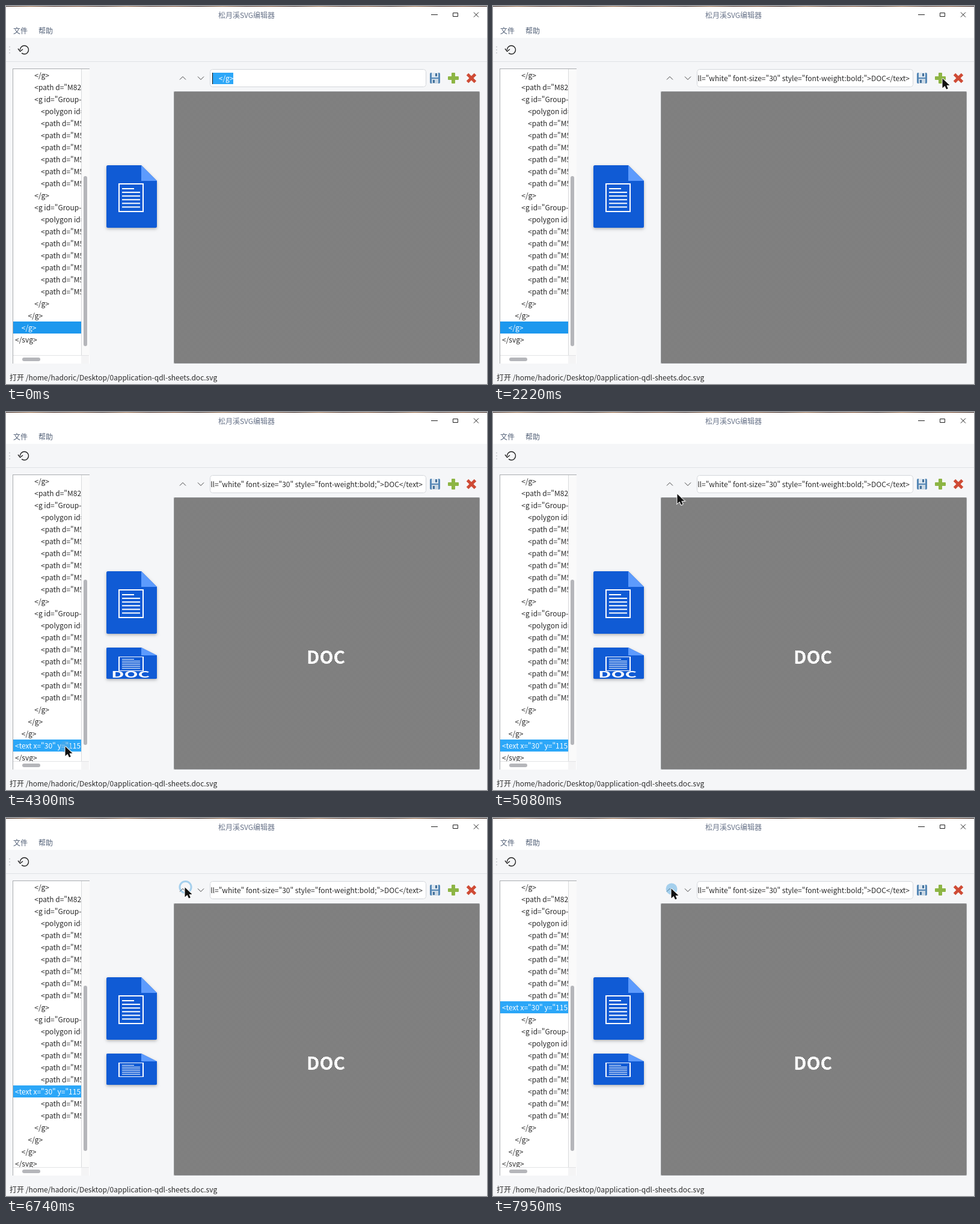
An HTML page with a canvas that plays this animation: 800x629 px, repeating every 8000 ms.

```html
<!DOCTYPE html>
<html lang="zh">
<head>
<meta charset="utf-8">
<style>
html, body { margin: 0; width: 100%; height: 100%; overflow: hidden; background: #f5f6f8; }
canvas { display: block; }
</style>
</head>
<body>
<canvas id="stage" width="800" height="629"></canvas>
<script>
const ctx = document.getElementById('stage').getContext('2d', { alpha: false });
const FONT = '"Noto Sans CJK SC", "Noto Sans CJK", "Noto Sans", sans-serif';
const LOOP = 8000;
const INK = '#2b2b2b', BACK = '#f5f6f8', HIGHLIGHT = '#2ca7f8';
const TEXT_TAG = '<text x="30" y="115" fill="white" font-size="30" style="font-weight:bold;">DOC</text>';
const PASTE = 710, INSERT = 2620, SELECT = 4300;

// Release times of the "move up" button; each one lifts the text row by one.
const lifts = [5850, ...Array.from({ length: 11 }, (_, i) => 6160 + i * 174)];
const presses = [2470, ...lifts.map(t => t - 112)];
const releases = [INSERT, SELECT, ...lifts];

// Pointer keys: time, x, y
const path = [
  [0, 343, 120], [110, 343, 120], [370, 467, 122], [1070, 467, 122], [1490, 747, 120],
  [3190, 747, 120], [3570, 238, 524], [3980, 102, 579], [4020, 102, 579], [4180, 98, 556],
  [4450, 98, 556], [4800, 314, 180], [4880, 314, 180], [5080, 306, 136], [5210, 298, 120],
  [5430, 298, 120], [5510, 297, 115], [7340, 297, 115], [7900, 296, 117], [8000, 296, 117]
];

const paths = n => Array(n).fill([4, '<path d="M53.7,82']);
const group = [[3, '<g id="Group-2"'], [4, '<polygon id="path"'], ...paths(6), [3, '</g>']];
const source = [[3, '</g>'], [3, '<path d="M82.5,31'], ...group, ...group,
  [2, '</g>'], [1, '</g>'], [0, '</svg>']];

const checker = (() => {
  const tile = document.createElement('canvas');
  tile.width = tile.height = 2;
  const c = tile.getContext('2d');
  c.fillStyle = '#fff';
  c.fillRect(0, 0, 2, 2);
  c.fillStyle = '#000';
  c.fillRect(0, 0, 1, 1);
  c.fillRect(1, 1, 1, 1);
  return ctx.createPattern(tile, 'repeat');
})();

function rect(x, y, w, h, color, radius = 0) {
  ctx.fillStyle = color;
  ctx.beginPath();
  ctx.roundRect(x, y, w, h, radius);
  ctx.fill();
}

function frame(x, y, w, h, color, width = 1, radius = 0) {
  ctx.strokeStyle = color;
  ctx.lineWidth = width;
  ctx.beginPath();
  ctx.roundRect(x, y, w, h, radius);
  ctx.stroke();
}

function line(points, color = INK, width = 1) {
  ctx.strokeStyle = color;
  ctx.lineWidth = width;
  ctx.beginPath();
  points.forEach(([x, y]) => ctx.lineTo(x, y));
  ctx.stroke();
}

function poly(points, color) {
  ctx.fillStyle = color;
  ctx.beginPath();
  points.forEach(([x, y]) => ctx.lineTo(x, y));
  ctx.closePath();
  ctx.fill();
}

function text(str, x, y, color = INK, font = '12px', align = 'left') {
  ctx.font = `${font} ${FONT}`;
  ctx.textAlign = align;
  ctx.fillStyle = color;
  ctx.fillText(str, x, y);
}

function clipped(x, y, w, h, paint) {
  ctx.save();
  ctx.beginPath();
  ctx.rect(x, y, w, h);
  ctx.clip();
  paint();
  ctx.restore();
}

function drawWindow() {
  rect(0, 0, 800, 629, BACK);
  rect(0, 0, 800, 53, '#fff');
  const strip = ctx.createLinearGradient(0, 0, 800, 0);
  for (let i = 0; i <= 20; i++) strip.addColorStop(i / 20, ['#2a1712', '#6b3a1d', '#3b2018', '#8a5a34'][i * 7 % 4]);
  rect(0, 0, 800, 1, strip);
  text('松月溪SVG编辑器', 400, 20, '#69748a', '12px', 'center');
  line([[707, 14.5], [718, 14.5]], '#222');
  frame(743.5, 11.5, 8, 6, '#222');
  line([[778, 10.5], [786, 18.5]], '#222');
  line([[786, 10.5], [778, 18.5]], '#222');
  text('文件', 12, 46, '#526077');
  text('帮助', 54, 46, '#526077');

  for (const y of [67, 72, 77]) rect(5, y, 2, 2, '#d3d5d9');
  ctx.strokeStyle = '#222';
  ctx.lineWidth = 1.4;
  ctx.beginPath();
  ctx.arc(30.5, 73, 7, Math.PI, Math.PI * 2.72);
  ctx.stroke();
  line([[20, 71], [23.5, 75.5], [28, 72]], '#222', 1.4);
  rect(0, 92, 800, 1, '#dfe1e5');
  text('打开 /home/hadoric/Desktop/0application-qdl-sheets.doc.svg', 6, 623);
}

function drawList(rows, selected, focused, inserted) {
  rect(11, 104, 128, 491, '#fff');
  rect(126, 105, 13, 476, '#fafafa');
  clipped(12, 105, 113, 476, () => rows.forEach(([indent, str], i) => {
    const y = 105 + i * 20;
    if (i === selected) rect(12, y, 113, 20, focused ? HIGHLIGHT : '#1d98ee');
    text(' '.repeat(indent * 4) + str, 15, y + 15, i === selected ? '#fff' : INK);
  }));
  rect(11, 104, 1, 491, '#a9acb0');
  rect(11, 104, 128, 1, '#a9acb0');
  rect(125, 105, 1, 476, '#d9dadc');
  rect(12, 581, 126, 1, '#e3e4e6');
  rect(125, 582, 13, 13, '#f4f4f5');
  if (inserted) rect(129, 279, 6, 275, '#b5b6ba', 3);
  else rect(129, 283, 6, 283, '#b5b6ba', 3);
  rect(27, 585, 30, 6, '#b5b6ba', 3);
}

function drawDocument(y, scaleY, label) {
  ctx.save();
  ctx.translate(145, y);
  ctx.scale(1, scaleY);
  ctx.save();
  ctx.shadowColor = 'rgba(0,0,0,.28)';
  ctx.shadowBlur = 5;
  ctx.shadowOffsetY = 2;
  ctx.fillStyle = '#105bd5';
  ctx.beginPath();
  ctx.moveTo(24, 15);
  ctx.lineTo(80, 15);
  ctx.lineTo(106, 41);
  ctx.arcTo(106, 119, 22, 119, 2.5);
  ctx.arcTo(22, 119, 22, 15, 2.5);
  ctx.arcTo(22, 15, 80, 15, 2.5);
  ctx.fill();
  ctx.restore();
  poly([[80, 15], [106, 41], [80, 41]], '#5d9bfd');
  frame(43, 46, 40, 46, '#fff', 2);
  for (let i = 0; i < 6; i++) rect(48, 53 + i * 6.1, i ? 30 : 20, 2, '#fff');
  if (label) text('DOC', 30, 115, '#fff', 'bold 30px');
  ctx.restore();
}

function drawToolbar(t, pressed) {
  if (pressed) {
    const x = t < SELECT ? 730.5 : 280.5;
    rect(x, 106.5, 27, 27, '#cbd8ea', 2);
    frame(x, 106.5, 27, 27, '#a6c8e8', 1, 2);
  }
  line([[289, 122.5], [294, 117.5], [299, 122.5]], '#444');
  line([[319, 117.5], [324, 122.5], [329, 117.5]], '#444');

  rect(339, 105, 360, 30, '#fff', 4);
  frame(339.5, 105.5, 359, 29, '#d3d6db', 1, 4);
  if (t < PASTE) {
    rect(343, 111, 35, 19, HIGHLIGHT);
    text('    </g>', 343, 125, '#fff');
    if (t < 110) rect(343, 111, 1, 19, '#111');
  } else {
    clipped(341, 106, 356, 28, () => text(TEXT_TAG, 693, 125, INK, '12px', 'right'));
    if (t < SELECT && (t - PASTE) % 1000 < 500) rect(694, 111, 1, 18, '#111');
  }

  rect(705, 111, 17, 18, '#5688b6', 2);
  rect(708, 111, 11, 8, '#dce6ef');
  rect(714, 112, 3, 5, '#44719b');
  rect(708, 121, 11, 8, '#c9d7e4');
  rect(710, 123, 3, 5, '#44719b');
  rect(741, 111, 6, 18, '#8db544', 1);
  rect(735, 117, 18, 6, '#8db544', 1);
  line([[767.5, 113.5], [780.5, 126.5]], '#cf4b35', 5);
  line([[780.5, 113.5], [767.5, 126.5]], '#cf4b35', 5);
}

function drawScene(labelled) {
  rect(279, 142, 509, 453, checker);
  frame(279.5, 142.5, 508, 452, '#96989b');
  if (labelled) text('DOC', 500, 419, '#fff', 'bold 30px');
}

function pointerAt(t) {
  const i = path.findIndex(key => key[0] > t);
  const [t0, x0, y0] = path[i - 1], [t1, x1, y1] = path[i];
  const k = (t - t0) / (t1 - t0);
  return [x0 + (x1 - x0) * k, y0 + (y1 - y0) * k];
}

function drawRipple(age, x, y) {
  ctx.beginPath();
  if (age < 55) {
    ctx.fillStyle = 'rgba(85,170,225,.5)';
    ctx.arc(x + 1, y + 1, 9.5, 0, 7);
    ctx.fill();
  } else {
    ctx.strokeStyle = 'rgba(85,170,225,.5)';
    ctx.lineWidth = 3;
    ctx.arc(x + 1.5, y, 9.5 + (age - 55) / 50, 0, 7);
    ctx.stroke();
  }
}

function drawPointer(t, [x, y]) {
  if (t < 110) return;
  if (y < 135 && x > 340 && x < 699) {
    line([[x - 3, y - 8.5], [x + 4, y - 8.5]], '#222');
    line([[x + .5, y - 8], [x + .5, y + 8]], '#222');
    line([[x - 3, y + 8.5], [x + 4, y + 8.5]], '#222');
    return;
  }
  const arrow = [[0, 0], [0, 16], [4, 12.5], [6.5, 18], [9.3, 17], [7, 11.5], [12, 11.5], [0, 0]]
    .map(([dx, dy]) => [x + .5 + dx, y + .5 + dy]);
  line(arrow, '#fff', 2);
  poly(arrow, '#111');
}

function draw(t) {
  const inserted = t >= INSERT, chosen = t >= SELECT;
  const position = 22 - lifts.filter(at => t >= at).length;
  const rows = [...source];
  if (inserted) rows.splice(position, 0, [0, TEXT_TAG]);
  // Inside the masked groups the label is not rendered.
  const labelled = position >= 20 || position === 11;

  drawWindow();
  drawList(rows, chosen ? position : 21, chosen, inserted);
  drawDocument(250, 1, false);
  if (inserted) drawDocument(384.5, .5, labelled);
  drawToolbar(t, presses.some(at => t >= at && t < at + (at === 2470 ? 150 : 112)));
  drawScene(chosen);

  const pointer = pointerAt(t);
  const release = releases.find(at => t >= at && t < at + 120);
  if (release) drawRipple(t - release, ...pointer);
  drawPointer(t, pointer);
}

function tick() {
  draw(performance.now() % LOOP);
  requestAnimationFrame(tick);
}
tick();
</script>
</body>
</html>
```
